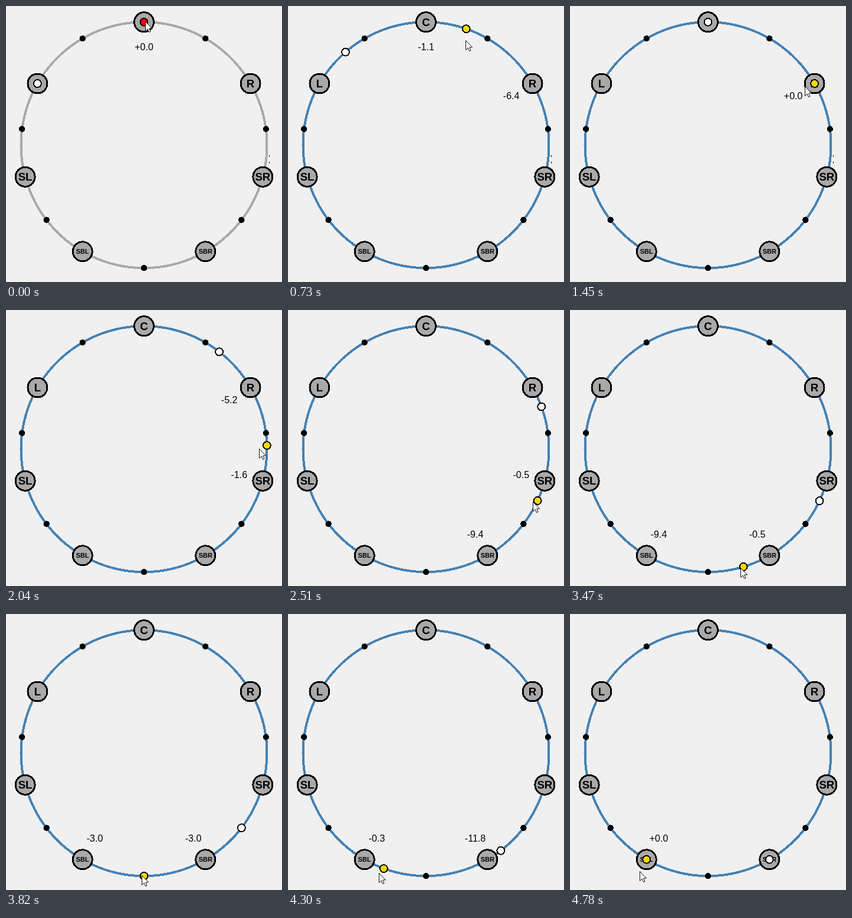
An HTML page that plays this animation: 468x468 px, repeating every 4880 ms.

```html
<!DOCTYPE html>
<html lang="en">
<head>
<meta charset="utf-8">
<title>Surround panner</title>
<style>
  html, body { margin: 0; width: 100%; height: 100%; overflow: hidden; background: #f0f0f0; }
  svg { display: block; width: 468px; height: 468px; }
  circle { shape-rendering: crispEdges; }
  text { font-family: "Liberation Sans", Arial, sans-serif; text-anchor: middle; }
  .ring { fill: none; stroke-width: 4; }
  .speaker circle { fill: #a9a9a9; stroke: #000; stroke-width: 3; }
  .speaker text { font-weight: bold; }
  .gain { font-size: 16px; }
  .handle { stroke: #000; stroke-width: 2; }
  .pointer { fill: #fff; stroke: #111; stroke-width: 1; }
</style>
</head>
<body>
<svg viewBox="0 0 468 468"></svg>
<script>
const LOOP = 4880, HOLD = 363, TICK = 119.2, LAST = 38;
const CX = 234, CY = 235.75, R = 208.5, GAIN_R = 167;
const SNAP = 3, LEAD = 1.5;
const names = ["L", "C", "R", "SR", "SBR", "SBL", "SL"];
const angles = [-60, 0, 60, 105, 150, 210, 255];

// Key points of the drag: [step, angle, pointer radius]
const drag = [[0, -1, 210], [4, 19.1, 190], [10, 57.3, 192], [15, 88.3, 195],
  [23, 141.4, 209], [30, 179.6, 207.5], [35, 205.2, 221], [LAST, 208.5, 231.6]];

const svg = document.querySelector("svg");

function set(el, attrs) {
  for (const key in attrs) el.setAttribute(key, attrs[key]);
}

function add(parent, tag, attrs, text = "") {
  const el = document.createElementNS("http://www.w3.org/2000/svg", tag);
  set(el, attrs);
  el.textContent = text;
  return parent.appendChild(el);
}

function polar(deg, r = R) {
  const a = deg * Math.PI / 180;
  return [CX + r * Math.sin(a), CY - r * Math.cos(a)];
}

function sample(track, x, col = 1) {
  const i = track.findIndex(row => row[0] > x);
  if (i < 0) return track[track.length - 1][col];
  const a = track[i - 1], b = track[i];
  return a[col] + (b[col] - a[col]) * (x - a[0]) / (b[0] - a[0]);
}

// Angle <-> fractional speaker index
const angleTrack = angles.map((a, i) => [i, a]);
const indexTrack = angles.map((a, i) => [a, i]);

const middles = angles.map((a, i) => (a + (angles[i + 1] ?? angles[0] + 360)) / 2);
const stops = [...angles, ...middles];
const snap = deg => stops.find(s => Math.abs(s - deg) <= SNAP) ?? deg;

const ring = add(svg, "circle", { class: "ring", cx: CX, cy: CY, r: R });
const marks = add(svg, "path", { d: "M446.5 253v3M446.5 264v3", stroke: "#000" });

for (const deg of middles) {
  const [cx, cy] = polar(deg);
  add(svg, "circle", { cx, cy, r: 5.2 });
}

const gains = names.map((name, i) => {
  const [cx, cy] = polar(angles[i]);
  const size = name.length > 2 ? 11 : 18.7;
  const g = add(svg, "g", { class: "speaker" });
  add(g, "circle", { cx, cy, r: 16.5 });
  add(g, "text", { x: cx, y: cy + size * 0.36, "font-size": size }, name);
  const [x, y] = polar(angles[i], GAIN_R);
  return add(svg, "text", { class: "gain", x, y: y + 6 });
});

const follower = add(svg, "circle", { class: "handle", r: 6.4, fill: "#fff" });
const handle = add(svg, "circle", { class: "handle", r: 6.4 });
const pointer = add(svg, "path", {
  class: "pointer",
  d: "M.5 .5V16.5L4.2 13 6.5 18.5 9 17.4 6.7 12H11.5Z"
});

function place(el, deg) {
  const [cx, cy] = polar(deg);
  set(el, { cx, cy });
}

function gainText(level) {
  if (level < 1e-6) return "";
  const db = 20 * Math.log10(level);
  return db > -0.05 ? "+0.0" : db.toFixed(1);
}

function draw() {
  const time = performance.now() % LOOP;
  const step = Math.min(LAST, Math.max(0, Math.floor((time - HOLD) / TICK) + 1));
  const idle = step === 0;
  const aim = sample(drag, step);
  const deg = snap(aim);
  const pos = sample(indexTrack, deg);

  set(ring, { stroke: idle ? "#a9a9a9" : "#4682b4" });
  set(handle, { fill: idle ? "#f00" : "#ffd700" });
  set(marks, { visibility: step < 15 ? "visible" : "hidden" });
  place(handle, deg);
  place(follower, sample(angleTrack, pos - 1));

  // Constant-power pan between the two neighbouring speakers
  gains.forEach((el, i) => {
    const d = Math.min(1, Math.abs(pos - i));
    el.textContent = gainText(Math.cos(d * Math.PI / 2));
  });

  const [x, y] = polar(aim + LEAD, sample(drag, step, 2)).map(Math.round);
  set(pointer, { transform: `translate(${x} ${y})` });
  requestAnimationFrame(draw);
}
draw();
</script>
</body>
</html>
```
